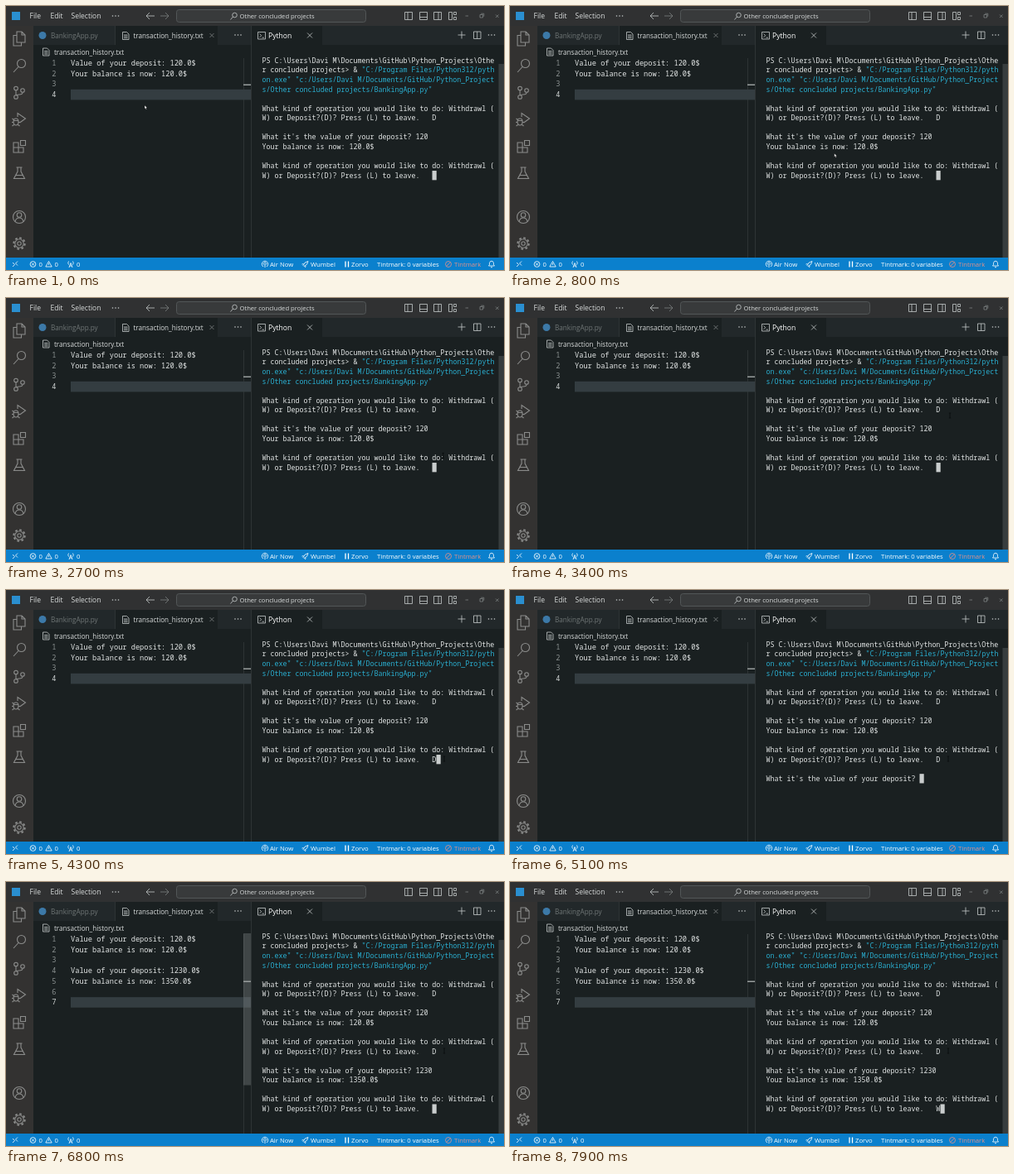
An HTML page that plays this animation: 600x319 px, repeating every 8000 ms.

```html
<!DOCTYPE html>
<html lang="en">
<head>
<meta charset="utf-8">
<title>Editor and terminal</title>
<style>
  html, body { margin: 0; height: 100%; overflow: hidden; background: #1a2021; }
  svg { display: block; width: 600px; height: 319px; }
  text { font: 8.15px "Open Sans", "Noto Sans", sans-serif; fill: #d8dbdb; white-space: pre; }
  .menu text { font-size: 8.5px; }
  .mono text { font-family: "Noto Sans Mono", monospace; fill: #e2e5e5; }
  #code text { font-size: 8.67px; }
  #term text { font-size: 8.34px; }
  #code .num { fill: #8b9191; text-anchor: end; }
  #code .on { fill: #d0d4d4; }
  #term .path { fill: #2aaed0; }
  #status text { font-size: 7.7px; fill: #fff; }
  #status .off { fill: #e0908a; }
  .icon { fill: none; stroke: #c5c9c9; stroke-width: .8; }
  .side { stroke: #8b8c8b; stroke-width: 1.1; }
  .white { stroke: #fff; }
  .dim { stroke: #7d8282; }
</style>
</head>
<body>
<svg viewBox="0 0 600 319">
  <rect width="600" height="319" fill="#1a2021"/>
  <rect width="600" height="24" fill="#303132"/>
  <rect y="24" width="33" height="280" fill="#333231"/>
  <path d="M33 24H600V47H33Z" fill="#22282a"/>
  <path d="M131 24H255V47H131ZM296 24H381V47H296Z" fill="#1a2021"/>
  <path d="M131.5 24V47M295.5 24V304M286.5 63V304" stroke="#2e3435" fill="none"/>
  <rect x="593.5" y="70" width="6.5" height="234" fill="#373d3e"/>

  <!-- title bar -->
  <rect x="7" y="7" width="10" height="10" fill="#2a8fd0"/>
  <g class="menu">
    <text x="28.5" y="15">File</text><text x="53.5" y="15">Edit</text><text x="78.5" y="15">Selection</text>
  </g>
  <rect x="205.5" y="4.5" width="228" height="15" rx="3" fill="#383a3b" stroke="#525657"/>
  <text x="281.5" y="15" style="font-size:7.65px">Other concluded projects</text>
  <g class="icon">
    <path d="M179 12H169M173 8L169 12L173 16"/>
    <path class="dim" d="M186 12H196M192 8L196 12L192 16"/>
    <circle cx="275.5" cy="11" r="2.8"/><path d="M273.5 13L270.5 16.5"/>
    <path d="M480.5 7.500h9v9h-9zM484 7.500v9M498.500 7.500h9v9h-9zM498.500 13.500h9M515.500 7.500h9v9h-9zM521 7.500v9"/>
    <path d="M533.500 7.500h4v9h-4zM539.500 7.500h3v3h-3zM539.500 13.500h3v3h-3z"/>
    <path class="dim" d="M553.500 12h3.500M571 10.500h3.500v3.500h-3.500zM572.300 9.200h3.500v3.500M590 10.500l3.500 3.500m0-3.500l-3.500 3.500"/>
  </g>

  <!-- tabs and breadcrumb -->
  <circle cx="44" cy="35.5" r="4.5" fill="#3c79a8"/>
  <text x="54" y="39" style="fill:#6f7676">BankingApp.py</text>
  <text x="153.5" y="39">transaction_history.txt</text>
  <text x="58" y="58.5">transaction_history.txt</text>
  <text x="316" y="39" style="font-size:8.6px;fill:#fff">Python</text>
  <g class="icon">
    <path id="doc" d="M140.5 31.5h5l2.5 2.5v6.5h-7.5zM142 35h4.500M142 36.800h4.500M142 38.600h4.500"/>
    <use href="#doc" x="-96" y="19.5"/>
    <path class="dim" d="M245.500 33l5 5m0-5l-5 5"/>
    <path d="M303.500 31.500h9v8.500h-9zM305.500 33.500l2.200 2.200-2.200 2.200M308.500 38.200h2.500"/>
    <path d="M363 32.500l6 6m0-6l-6 6M544.500 35h9M549 30.500v9M563.500 31h8.500v8.500h-8.500zM567.700 31v8.500"/>
  </g>
  <g id="dots" fill="#c5c9c9"></g>

  <!-- activity bar -->
  <g class="icon side">
    <path d="M13 31h6l4 4v9H13zM19 31v4h4M13 35.500H9V48H18.500V44"/>
    <circle cx="18.5" cy="69.5" r="5"/><path d="M15 73.500L9 80"/>
    <circle cx="12" cy="99.5" r="2.3"/><circle cx="20" cy="102" r="2.3"/><circle cx="12" cy="110" r="2.3"/>
    <path d="M12 102V107.500M20 104.500Q20 107 16 107T12 108"/>
    <path d="M14 134V129.500L23.500 136L16.500 141"/>
    <ellipse cx="12" cy="140" rx="3" ry="4"/>
    <path d="M9 138.500h6M7.500 136l2 1.500M7 140.500h2M7.500 145l2-1.500M16.500 145l-2-1.500M15 140.500h2"/>
    <path d="M9 165h6v6h6v6H9zM9 171h6v6M17.500 162.500h6v6h-6z"/>
    <path d="M12.500 195h7M14 195v5l-4.500 8.500h13L18 200v-5M11.500 204.500h9"/>
    <circle cx="16" cy="255" r="7.5"/><circle cx="16" cy="252.5" r="2.8"/><path d="M11 260.500q1-4.500 5-4.500t5 4.500"/>
    <circle cx="16" cy="287" r="2.2"/><circle cx="16" cy="287" r="5.2"/>
    <circle cx="16" cy="287" r="6.7" stroke-width="2" stroke-dasharray="2.6 2.662"/>
  </g>

  <rect id="active" x="78" width="217" height="12.6" fill="#343d41"/>
  <rect id="slider" x="286" y="62" width="9" height="183.5" fill="#8b9090" fill-opacity=".34"/>
  <rect id="ruler" x="286" width="9" height="1.5" fill="#989d9d"/>
  <g id="code" class="mono"></g>
  <rect id="caret" width="5.2" height="11.3" fill="#c9cdcd"/>
  <g id="term" class="mono"></g>

  <!-- status bar -->
  <g id="status">
    <rect y="304" width="600" height="15" fill="#0b80cd"/>
    <text x="39.5" y="314.8">0</text><text x="58.5" y="314.8">0</text><text x="85" y="314.8">0</text>
    <text x="318" y="314.8">Air Now</text><text x="367" y="314.8">Wumbel</text>
    <text x="416" y="314.8">Zorvo</text><text x="447" y="314.8">Tintmark: 0 variables</text>
    <text class="off" x="540" y="314.8">Tintmark</text>
    <g class="icon white">
      <path d="M8 310l2.500 2.500L8 315M14 308.500l-2.500 2.500 2.500 2.500"/>
      <circle cx="32.5" cy="312" r="3.4"/><path d="M31 310.500l3 3m0-3l-3 3"/>
      <path d="M51.500 308.500l3.700 6.500h-7.400zM51.500 310.800v2"/>
      <path d="M78 310.500L76 316M78 310.500L80 316M76.700 314h2.600M75.500 308.500q-1.500 2 0 4M80.500 308.500q1.500 2 0 4"/>
      <path d="M310 315a3.700 3.700 0 1 1 4 0M310.800 312.700a1.700 1.700 0 1 1 2.400 0M312 311.500v4.500"/>
      <path d="M358 313.500q1.500-4.500 6-5-.5 4.500-5 6zM358.500 311.500l-2 .5M361 314l-.5 2"/>
      <path d="M409 308.500v7M412.500 308.500v7" stroke-width="1.3"/>
      <path d="M581.500 314h7l-1-1.500v-2q-.5-2.300-2.500-2.300t-2.500 2.300v2zM584 315.700h2"/>
    </g>
    <g class="icon" style="stroke:#e0908a"><circle cx="533" cy="312" r="3.5"/><path d="M530.500 314.500l5-5"/></g>
  </g>

  <path id="arrow" d="M0 0V4.300L1 3.400L1.700 5L2.500 4.700L1.800 3.100H3.100Z" fill="#fff" stroke="#111" stroke-width=".35"/>
  <path id="beam" d="M-1.200-3H1.200M0-3V3M-1.200 3H1.200" stroke="#070909" stroke-width=".7" fill="none"/>
</svg>
<script>
const $ = id => document.getElementById(id);
const LOOP = 8000, CELL = 5, ROW = 11.57, TERM_X = 308.5;
const SAVED = 6600, SLIDER_GONE = 7400;
const ASK = ["What kind of operation you would like to do: Withdrawl (",
  "W) or Deposit?(D)? Press (L) to leave.   "];
const AMOUNT = "What it's the value of your deposit? ";
// Text after a bar takes the path colour
const HEAD = [
  "PS C:\\Users\\Davi M\\Documents\\GitHub\\Python_Projects\\Othe",
  'r concluded projects> & |"C:/Program Files/Python312/pyth',
  '|on.exe" "c:/Users/Davi M/Documents/GitHub/Python_Project',
  '|s/Other concluded projects/BankingApp.py"'
];

const label = (x, y, s, cls = "") => `<text x="${x}" y="${y}" class="${cls}">${s.replace(/&/g, "&amp;")}</text>`;
const show = (id, on) => $(id).setAttribute("visibility", on ? "visible" : "hidden");
const typed = (s, t, times) => s.slice(0, times.filter(k => t >= k).length);
const deposit = (amount, balance) => ["", AMOUNT + amount, `Your balance is now: ${balance}$`, ""];

function terminalLines(t) {
  const lines = [...HEAD, "", ASK[0], ASK[1] + "D", ...deposit("120", "120.0"),
    ASK[0], ASK[1] + typed("D", t, [4200])];
  if (t >= 4700) {
    if (t < 6500) lines.push("", AMOUNT + typed("1230", t, [5300, 5600, 5800, 6000]));
    else lines.push(...deposit("1230", "1350.0"), ASK[0], ASK[1] + typed("W", t, [7500]));
  }
  return lines;
}

function drawTerminal(t) {
  const lines = terminalLines(t), last = lines.length - 1;
  $("term").innerHTML = lines.map((line, i) => {
    const [plain, path = ""] = line.split("|"), y = 68.8 + i * ROW;
    return label(TERM_X, y, plain) + label(TERM_X + plain.length * CELL, y, path, "path");
  }).join("");
  $("caret").setAttribute("x", TERM_X + lines[last].length * CELL);
  $("caret").setAttribute("y", 60.2 + last * ROW);
}

function drawEditor(t) {
  const lines = ["Value of your deposit: 120.0$", "Your balance is now: 120.0$", ""];
  if (t >= SAVED) lines.push("Value of your deposit: 1230.0$", "Your balance is now: 1350.0$", "");
  lines.push("");
  const last = lines.length - 1;
  $("code").innerHTML = lines.map((line, i) => {
    const y = 71.8 + i * 12.77;
    return label(60.5, y, `${i + 1}`, i === last ? "num on" : "num") + label(78, y, line);
  }).join("");
  $("active").setAttribute("y", 62.5 + last * 12.77);
  $("ruler").setAttribute("y", t >= SAVED ? 119.5 : 94.5);
  show("slider", t >= SAVED && t < SLIDER_GONE);
}

// Pointer stops: time, x, y
const STOPS = [[0, 167, 120], [100, 167, 120], [1300, 525, 213], [2400, 525, 213],
  [3200, 530, 142], [4000, 530, 142], [4300, 528, 204], [LOOP, 528, 204]];

function drawPointer(t) {
  const i = STOPS.findIndex(s => s[0] > t), a = STOPS[i - 1], b = STOPS[i];
  const p = (t - a[0]) / (b[0] - a[0]), e = p * p * (3 - 2 * p);
  const place = `translate(${a[1] + (b[1] - a[1]) * e} ${a[2] + (b[2] - a[2]) * e})`;
  for (const id of ["arrow", "beam"]) $(id).setAttribute("transform", place);
  show("arrow", t < 2600);
  show("beam", t >= 2600);
}

$("dots").innerHTML = [[132, 12], [279.5, 35], [585, 35]].map(([x, y]) =>
  [-3.5, 0, 3.5].map(d => `<circle cx="${x + d}" cy="${y}" r=".8"/>`).join("")).join("");

function frame() {
  const t = performance.now() % LOOP;
  drawTerminal(t);
  drawEditor(t);
  drawPointer(t);
  requestAnimationFrame(frame);
}
frame();
</script>
</body>
</html>
```
